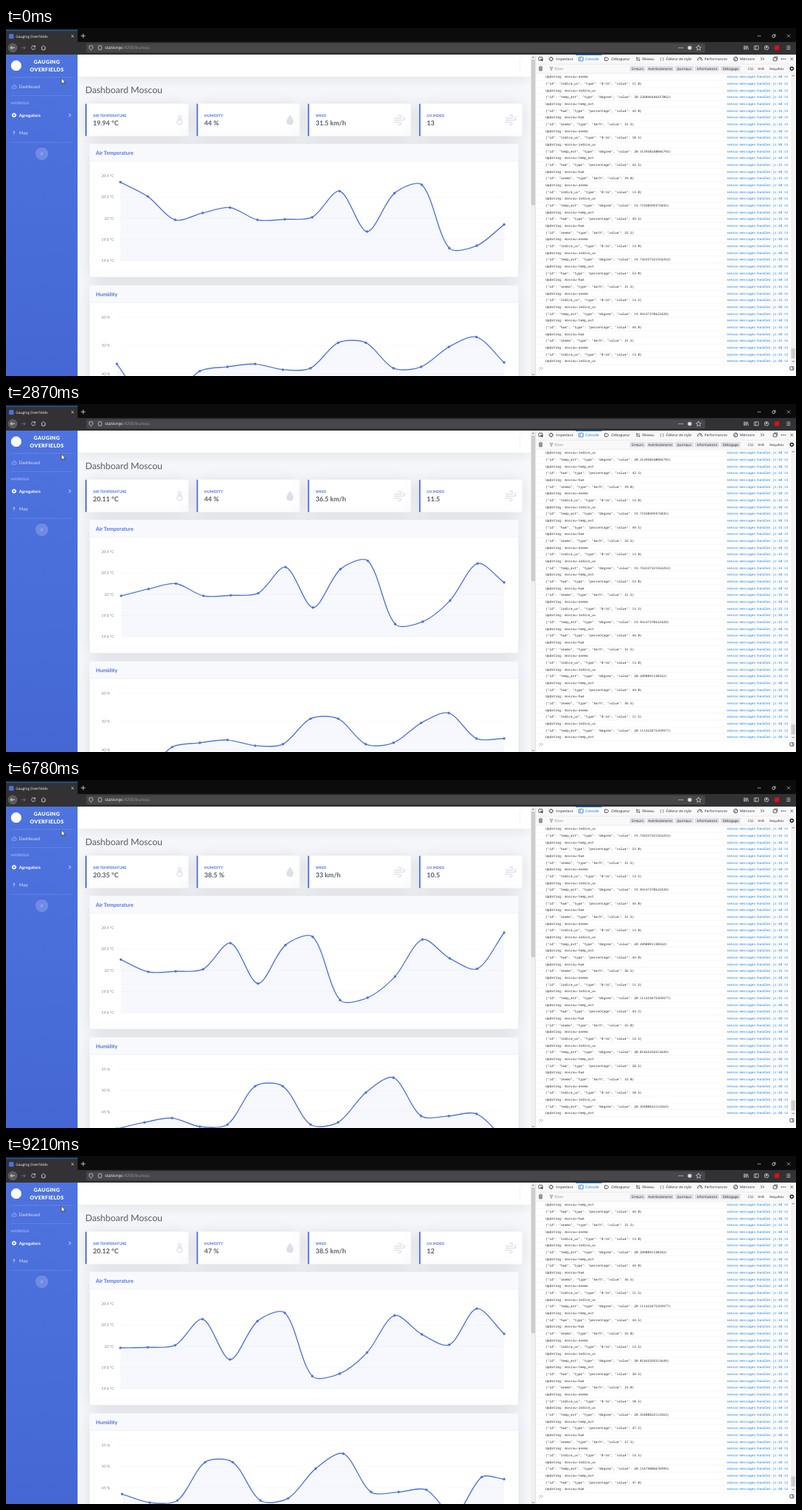
Write an HTML page that moves like this. It is 1126 by 497 pixels and loops after 9.24 s.

```html
<!DOCTYPE html>
<html lang="fr">
<head>
<meta charset="utf-8">
<title>Dashboard</title>
<style>
  html, body { margin: 0; width: 100%; height: 100%; overflow: hidden; background: #f8f9fc; }
  svg { display: block; text-rendering: geometricPrecision; }
  text { white-space: pre; }
  .page { font-family: Lato, "Open Sans", sans-serif; }
  .ui { font-family: "Open Sans", "Noto Sans", sans-serif; }
  .mono { font-family: "Noto Sans Mono", "DejaVu Sans Mono", monospace; }
  .bold { font-weight: 700; }
  .black { font-weight: 900; }
  .shadow { filter: drop-shadow(0 1px 12px #3a3b4526); }
</style>
</head>
<body>
<svg id="stage" width="1126" height="497" viewBox="0 0 1126 497"></svg>
<script>
const LOOP = 9240, BLUE = '#4e73df', INK = '#2a2a2e', LIGHT = '#d7d7db';
const ROWS = 43, ROW_H = 9.667, COUNT = 15, PLOT_H = 121.5;
const tempTimes = [40, 2310, 4210, 6180, 8210];
const humTimes = [897, 3010, 4850, 6950, 8900];

// temperature, humidity, wind, UV for each round of messages
const rounds = [
  ['20.20512847736150', '51.0', '33.0', '11.0'],
  ['20.236046446437062', '42.0', '31.5', '10.5'],
  ['20.313950240046793', '42.5', '39.0', '13.0'],
  ['19.71920495972845', '49.5', '35.5', '13.0'],
  ['19.742337321554253', '53.0', '31.5', '13.5'],
  ['19.94147378622428', '44.0', '31.5', '13.0'],
  ['20.2890891130342', '44.0', '36.5', '11.5'],
  ['20.111423475359977', '44.5', '35.0', '14.5'],
  ['20.01465293513649', '38.5', '33.0', '10.5'],
  ['20.35408822112563', '47.5', '37.5', '14.5'],
  ['20.11679806676999', '47.0', '38.5', '12.0']
];
const sensors = [['temp_ext', 'degree'], ['hum', 'percentage'], ['anemo', 'km/h'], ['indice_uv', '0-16']];
const series = (early, i) => early.concat(rounds.slice(1).map(r => +r[i]));

const charts = [
  { id: 'temp', x: 163, top: 211, labelX: 154, unit: '°C', step: .2, times: tempTimes,
    data: series([20.34, 20.205, 19.985, 20.05, 20.1, 19.985, 19.99, 20.01, 20.255, 19.875], 0),
    range: () => [19.6, 20.4], tick: v => +v.toFixed(1) },
  { id: 'hum', x: 158, top: 413, labelX: 148.5, unit: '%', times: humTimes,
    data: series([43.5, 31, 32, 41, 42.5, 43.5, 41.5, 42, 51, 51], 1),
    range: n => n < 3 ? [30, 60] : [35, 55], tick: v => Math.round(v) }
];

const logLines = rounds.flatMap(r => sensors.flatMap(([id, type], i) => [
  [`{"id": "${id}", "type": "${type}", "value": ${r[i]}}`, 35],
  [`Updating: moscou-${id}`, 50]
]));
const logTimes = tempTimes.flatMap((t, i) => [
  ...[70, 170].map(d => t + d),
  ...[70, 170, 320, 350, 420, 460].map(d => humTimes[i] + d)
]);

// ---- drawing helpers; text is placed by its vertical centre ----
const rect = (x, y, w, h, fill, more = '') =>
  `<rect x="${x}" y="${y}" width="${w}" height="${h}" fill="${fill}" ${more}/>`;
const circle = (x, y, r, fill, more = '') =>
  `<circle cx="${x}" cy="${y}" r="${r}" fill="${fill}" ${more}/>`;
const text = (x, y, s, size, fill, cls = 'page', more = '') =>
  `<text x="${x}" y="${y + size * .36}" font-size="${size}" fill="${fill}" class="${cls}" ${more}>${s}</text>`;
const line = (d, stroke, w = .8, more = '') =>
  `<path d="${d}" fill="none" stroke="${stroke}" stroke-width="${w}" ${more}/>`;
const cross = (x, y, r, c) => line(`M${x - r} ${y - r}l${2 * r} ${2 * r}m0 ${-2 * r}l${-2 * r} ${2 * r}`, c, .7);
const box = (x, y, w, h, c) => rect(x - w / 2, y - h / 2, w, h, 'none', `rx=".7" stroke="${c}" stroke-width=".8"`);
const ring = (x, y, r, c) => circle(x, y, r, 'none', `stroke="${c}" stroke-width=".9"`);
const dots = (x, y, c) => [-2.6, 0, 2.6].map(d => circle(x + d, y, .8, c)).join('');
const gear = (x, y, c) => circle(x, y, 2, 'none', `stroke="${c}" stroke-width="1.5"`) +
  circle(x, y, 2.9, 'none', `stroke="${c}" stroke-width="1" stroke-dasharray="1.14"`);
const END = 'text-anchor="end"', MID = 'text-anchor="middle"';

function page() {
  const thermo = 'M245.7 131v-4.6a1.8 1.8 0 0 1 3.6 0V131a3.7 3.7 0 1 1-3.6 0zM247.5 128v6';
  const wind = x => `M${x} 128.5h8.5a2 2 0 1 0-2-2.4M${x} 131.5h13a2.2 2.2 0 0 0 0-4.4M${x} 134.5h8a2 2 0 1 1-2 2.4`;
  const icon = d => line(d, '#dddfeb', 1.4);
  const cards = ['AIR TEMPERATURE', 'HUMIDITY', 'WIND', 'UV INDEX'].map((label, i) => {
    const x = 113 + i * 158.6;
    return rect(x, 108, 147, 46.5, '#fff', 'rx="2" class="shadow"') +
      rect(x, 108, 2, 46.5, BLUE, 'rx="1"') +
      text(x + 11, 125, label, 5.3, BLUE, 'page bold') +
      text(x + 11, 136, '', 9.4, '#5a5c69', 'page bold', `id="value${i}"`);
  }).join('');
  const panel = (y, h, title, id) =>
    rect(119, y, 611.5, h, '#fff', 'rx="2" stroke="#e3e6f0" stroke-width=".5" class="shadow"') +
    rect(119.3, y + .3, 611, 24.2, '#f8f9fc') + rect(119, y + 24.3, 611.5, .5, '#e3e6f0') +
    text(128, y + 12.5, title, 7.5, BLUE, 'page bold') +
    `<g id="${id}Axis"></g><path id="${id}Fill" fill="${BLUE}" fill-opacity=".05"/>` +
    line('', BLUE, 1.4, `id="${id}Line"`) +
    line('', BLUE, 3.6, `id="${id}Dots" stroke-linecap="round"`);
  return rect(102, 38, 646, 459, '#f8f9fc') +
    rect(102, 38, 646, 31.5, '#fff', 'class="shadow"') + rect(732.5, 44, .5, 19, '#e3e6f0') +
    text(113, 88.8, 'Dashboard Moscou', 12.9, '#5a5c69') + cards +
    icon(thermo) + icon(wind(553)) + icon(wind(711.5)) +
    `<path d="M404.7 123.5c1 3 5 6.5 5 10a5 5 0 0 1-10 0c0-3.5 4-7 5-10z" fill="#dddfeb"/>` +
    panel(165.5, 190.5, 'Air Temperature', 'temp') + panel(367.5, 191, 'Humidity', 'hum') +
    rect(748, 38, 7, 459, '#f0f0f0') + rect(748.5, 45, 5.5, 208, '#cdcdcd') +
    line('M749.7 42.8l1.6-1.6 1.6 1.6M749.7 494l1.6 1.6 1.6-1.6', '#505050');
}

function sidebar() {
  const white = a => `rgba(255,255,255,${a})`;
  const rule = y => rect(7, y, 88, .6, white(.2));
  return rect(0, 38, 102, 459, 'url(#side)') + circle(14.5, 53.7, 7.4, '#fff') +
    ['GAUGING', 'OVERFIELDS'].map((s, i) =>
      text(58.3, 48.3 + i * 10.8, s, 7.4, '#fff', 'page black', `${MID} letter-spacing=".4"`)).join('') +
    rule(70) + rule(96) + rule(163) +
    line('M8.8 86.2a3.2 3.2 0 1 1 5.6 0zM11.6 85l1.2-2.4', white(.4), 1) +
    text(18.5, 83.5, 'Dashboard', 6.3, white(.8)) +
    text(7, 107.5, 'INTERFACE', 4.9, white(.4), 'page black') +
    gear(11.5, 124.5, '#fff') + text(18.5, 124.5, 'Agregators', 6.3, '#fff', 'page bold') +
    line('M89.8 122.2l2.3 2.3-2.3 2.3', '#fff', 1) +
    circle(11.5, 148.5, 1.6, white(.4)) + line('M11.5 149v4', white(.4), .9) +
    text(18.5, 150, 'Map', 6.3, white(.8)) +
    circle(51, 179.6, 9.2, white(.2)) + line('M52 177.4l-2.2 2.2 2.2 2.2', white(.6), 1) +
    `<path d="M79 71.5v8.4l2-1.9 1.3 3 1.2-.5-1.3-2.9h2.7z" fill="#fff" stroke="#111" stroke-width=".6"/>`;
}

function browser() {
  return rect(0, 0, 1126, 20, '#0c0c0d') + rect(0, 20, 1126, 18, '#323234') +
    rect(0, 3, 102, 17.5, '#323234') + rect(0, 2.6, 102, 1, '#0a84ff') +
    rect(4.3, 8.6, 6.6, 6.6, BLUE) + text(14, 11.7, 'Gauging OverFields', 5.05, '#f9f9fa', 'ui') +
    cross(94.8, 11.7, 1.7, '#f9f9fa') + line('M106.8 11.2h6.4m-3.2-3.2v6.4', LIGHT, .9) +
    line('M1071 11.3h5', LIGHT, .7) + box(1094, 11.8, 3.4, 3.4, LIGHT) +
    line('M1093.5 9.2h3.3v3.4', LIGHT, .7) + cross(1115.5, 11.3, 2.1, LIGHT) +
    circle(9.5, 28.2, 6.3, '#59595c', 'stroke="#77777a" stroke-width=".5"') +
    line('M12.5 28.2h-6m2.4-2.4l-2.4 2.4 2.4 2.4', '#f9f9fa', .9) +
    line('M21.8 28.2h6m-2.4-2.4l2.4 2.4-2.4 2.4', '#7a7a7d', .9) +
    line('M41.2 26.4a2.7 2.7 0 1 0 .5 2.4M41.7 25v2.1h-2.1', LIGHT, .9) +
    line('M50 28.3l3.4-3.2 3.4 3.2M51.2 27.8v3.3h4.4v-3.3', LIGHT, .9) +
    rect(114.5, 22, 882, 13, '#474749', 'rx="1.2"') +
    line('M118.5 26l2.6-.9 2.6.9c0 3-.8 4.5-2.6 5.4-1.8-.9-2.6-2.4-2.6-5.4z', LIGHT) + box(134, 28.2, 4.4, 5.6, LIGHT) +
    text(141, 28.3, 'stationpc<tspan fill="#98989b">:4200/bureau</tspan>', 6.05, '#f9f9fa', 'ui') +
    dots(962, 28.2, LIGHT) + circle(974.5, 28.2, 2.8, LIGHT) +
    line('M987.2 24.7l1.1 2.3 2.5.3-1.8 1.8.4 2.5-2.2-1.2-2.2 1.2.4-2.5-1.8-1.8 2.5-.3z', LIGHT) +
    line('M1052 25.3v5.7m1.7-5.7v5.7m1.7-5.7v5.7m1.2-5.4l1.7 5.4', LIGHT, .9) +
    box(1069.5, 28.2, 6.2, 5.2, LIGHT) + line('M1068.7 25.6v5.2', LIGHT) +
    ring(1084, 28.2, 2.9, LIGHT) + circle(1084, 27.6, 1.2, LIGHT) +
    rect(1095.5, 25, 6.6, 6.6, '#e00d17', 'rx="1"') +
    line('M1112.7 26h5.4m-5.4 2.2h5.4m-5.4 2.2h5.4', LIGHT, .8);
}

function devtools() {
  const tabs = [[784, 'Inspecteur'], [826, 'Console'], [863, 'Débogueur'], [907, 'Réseau'],
    [941, 'Éditeur de style'], [995.5, 'Performances'], [1046, 'Mémoire']];
  const filters = [[889, 22.5, 'Erreurs'], [913.5, 38, 'Avertissements'], [953.5, 26.5, 'Journaux'],
    [982, 34.5, 'Informations'], [1018.5, 28.5, 'Débogage']];
  const plain = [[1061.5, 'CSS'], [1076, 'XHR'], [1098.5, 'Requêtes']];
  let out = rect(755, 38, 371, 459, '#fff') + rect(755, 38, 371, 27, '#f9f9fa') +
    rect(755, 51, 371, .5, '#dcdce0') + rect(755, 64.6, 371, .5, '#dcdce0') +
    rect(754.6, 38, .6, 459, '#cfcfd3') + rect(812, 38, 37, 1, '#0a84ff');
  tabs.forEach(([x, s], i) => out += text(x, 44.4, s, 5, i === 1 ? '#0060df' : INK, 'ui'));
  filters.forEach(([x, w, s]) => out += rect(x, 54.2, w, 7.6, '#dfdfe6', 'rx="1"') +
    text(x + w / 2, 58, s, 4.8, INK, 'ui', MID));
  plain.forEach(([x, s]) => out += text(x, 58, s, 4.7, INK, 'ui', MID));
  out += box(762, 44, 5.6, 4.6, INK) + line('M762 44l3 3', INK, 1.2) +
    box(777, 44.3, 4.2, 4.2, INK) + line('M777 41v1.4m0 3.8v1.4m-3.3-3.3h1.4m3.8 0h1.4', INK) +
    box(819.5, 44.3, 6, 5.4, '#0060df') + line('M818 43l1.3 1.3-1.3 1.3', '#0060df') +
    line('M853.3 42.2h3.6l2.2 2.1-2.2 2.1h-3.6z', INK) +
    line('M899.5 47v-5.2l-1.4 1.4m4-1.4V47l1.4-1.4', INK) +
    text(935, 44.2, '{ }', 5.6, INK, 'ui', MID) +
    line('M986.2 46.6a3.1 3.1 0 1 1 5.6 0M989 45.5l1.3-2.2', INK, .9) +
    ring(1040, 44.3, 2.8, INK) + line('M1038.8 45.8l2.4-3', INK) +
    line('M1075.5 42.2l2 2-2 2m3-4l2 2-2 2', INK) + box(1096, 44.7, 5, 4.2, INK) +
    line('M1095.5 42.4v-1.3h3.8v4', INK, .7) + dots(1108, 44.3, INK) + cross(1120, 44.3, 2, INK) +
    line('M759.5 55.8h5m-3.3-1h1.6m-2.7 1.2v4.8h3.8v-4.8m-2.6 1v2.8m1.4-2.8v2.8', INK, .7) +
    line('M775 56h4.4l-1.6 2v2.4l-1.2-.6V58z', '#737373', .7) +
    text(781.5, 58, 'Filtrer', 4.9, '#8a8a8e', 'ui') + gear(1120, 58, INK);
  for (let i = 0; i < ROWS; i++) {
    const y = 69.6 + i * ROW_H;
    out += rect(755, y + 4.6, 363, .5, '#ececef') +
      text(769, y, '', 4.59, INK, 'mono', `id="log${i}"`) +
      text(1114.5, y, '', 4.56, '#0074e8', 'mono', `id="src${i}" ${END}`);
  }
  return out + rect(1118.5, 65, 7, 416, '#f2f2f2') + rect(1119.2, 457.5, 5.6, 14.5, '#cdcdcd') +
    line('M1120.4 69l1.6-1.6 1.6 1.6M1120.4 475.4l1.6 1.6 1.6-1.6', '#505050') +
    line('M760 484l2 2-2 2m3-4l2 2-2 2', '#8a8a8e', .7) +
    box(1120, 486, 5.4, 4.6, INK) + line('M1121 483.7v4.6', INK, .7);
}

const stage = document.getElementById('stage');
stage.innerHTML = `<defs><linearGradient id="side" x1="0" y1="0" x2="0" y2="1">
  <stop offset="0" stop-color="${BLUE}"/><stop offset="1" stop-color="#4467d4"/></linearGradient></defs>` +
  page() + sidebar() + devtools() + browser();

// ---- motion ----
const $ = id => document.getElementById(id);
const passed = (times, t) => times.filter(s => t >= s).length;
const setText = (id, s) => { if ($(id).textContent !== s) $(id).textContent = s; };
const mix = (a, b, p) => a + (b - a) * p;
const yOf = (c, v, [lo, hi]) => c.top + PLOT_H * (hi - v) / (hi - lo);

function axis(c, range) {
  const [lo, hi] = range, step = c.step || (hi - lo > 20 ? 10 : 5);
  let out = '';
  for (let v = hi; v > lo - step / 2; v -= step) {
    const y = yOf(c, v, range);
    out += line(`M${c.x} ${y}H710`, '#eaecf4', .6, 'stroke-dasharray="1"') +
      text(c.labelX, y, `${c.tick(v)} ${c.unit}`, 5.5, '#858796', 'page', END);
  }
  return out;
}

// Smooth curve with tension .3, control points kept inside the plot
function curve(pts, c) {
  const clamp = y => Math.max(c.top, Math.min(c.top + PLOT_H, y));
  const controls = pts.map((p, i) => {
    const a = pts[i - 1] || p, b = pts[i + 1] || p;
    const da = Math.hypot(p[0] - a[0], p[1] - a[1]), db = Math.hypot(b[0] - p[0], b[1] - p[1]);
    const arm = k => [p[0] + k * (b[0] - a[0]), clamp(p[1] + k * (b[1] - a[1]))];
    return [arm(-.3 * da / (da + db)), arm(.3 * db / (da + db))];
  });
  return pts.map((p, i) => i ? `C${controls[i - 1][1]} ${controls[i][0]} ${p}` : `M${p}`).join('');
}

function drawChart(c, t) {
  const n = passed(c.times, t), now = c.range(n), old = c.range(n - 1);
  const x = n ? Math.min(1, (t - c.times[n - 1] + 30) / 1000) : 1;
  const p = 1 - (1 - x) ** 4, gap = (710 - c.x) / (COUNT - 1);
  const pts = c.data.slice(n, n + COUNT).map((v, i) => {
    const q = i === COUNT - 1 ? 1 : p;
    return [c.x + gap * (i + 1 - q), mix(yOf(c, v, old), yOf(c, v, now), q)];
  });
  const d = curve(pts, c);
  $(c.id + 'Line').setAttribute('d', d);
  $(c.id + 'Fill').setAttribute('d', `${d}V${c.top + PLOT_H}H${pts[0][0]}z`);
  $(c.id + 'Dots').setAttribute('d', pts.map(q => `M${q}h0`).join(''));
  if (c.shown !== now[1]) {
    c.shown = now[1];
    $(c.id + 'Axis').innerHTML = axis(c, now);
  }
}

let logEnd;
function drawLog(t) {
  const end = 48 + passed(logTimes, t);
  if (end === logEnd) return;
  logEnd = end;
  logLines.slice(end - ROWS, end).forEach(([s, at], i) => {
    setText('log' + i, s);
    setText('src' + i, `sensor-messages-handler.js:${at}:13`);
  });
}

const start = performance.now();
function frame() {
  const t = (performance.now() - start) % LOOP;
  charts.forEach(c => drawChart(c, t));
  const temp = rounds[5 + passed(tempTimes, t)][0];
  const [, hum, wind, uv] = rounds[5 + passed(humTimes, t)];
  [(+temp).toFixed(2) + ' °C', +hum + ' %', +wind + ' km/h', `${+uv}`].forEach((s, i) => setText('value' + i, s));
  drawLog(t);
  requestAnimationFrame(frame);
}
frame();
</script>
</body>
</html>
```
